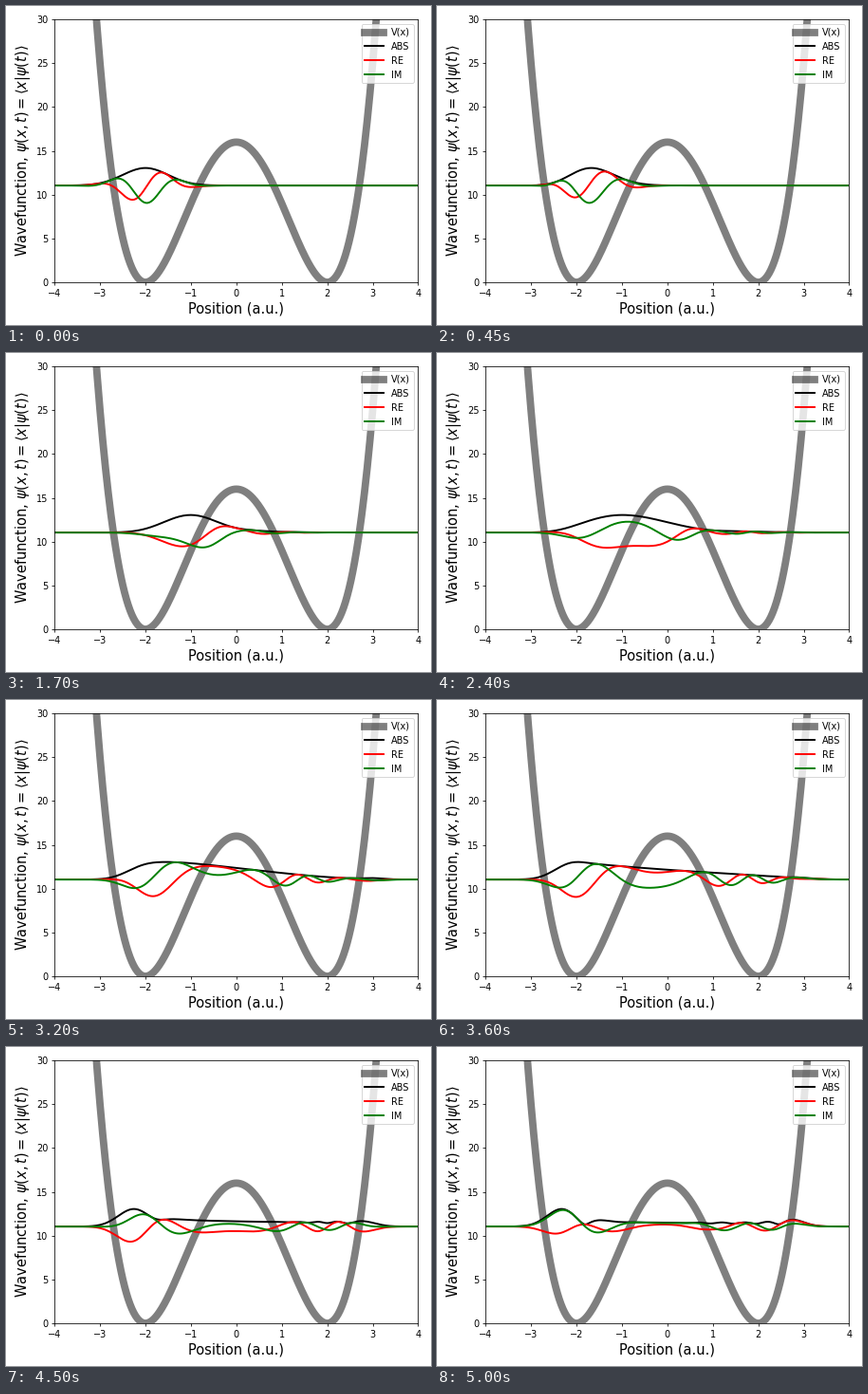
A matplotlib script that plays this animation: 448 by 336 pixels, repeating every 5050 ms.

```python
import numpy as np
import matplotlib.pyplot as plt
from matplotlib.animation import FuncAnimation

W, H, DPI = 448, 336, 70
FRAMES, INTERVAL, DT = 101, 50, 0.01
X0, K0, AMP = -2.0, 4.0, 2.0

plt.rcParams["font.family"] = "DejaVu Sans"


def potential(x):
    return (x**2 - 4) ** 2


# Sinc-grid Hamiltonian (hbar = m = 1)
x = np.linspace(-5, 5, 241)
dx = x[1] - x[0]
idx = np.arange(x.size)
diff = idx[:, None] - idx[None, :]
safe = np.where(diff == 0, 1, diff)
kinetic = np.where(diff == 0, np.pi**2 / 6, (-1.0) ** np.abs(diff) / safe**2) / dx**2
ham = kinetic + np.diag(potential(x))
levels, modes = np.linalg.eigh(ham)

# Gaussian packet moving right, expanded in energy states
psi0 = np.exp(-2 * (x - X0) ** 2 + 1j * K0 * x)
psi0 /= np.linalg.norm(psi0)
coeffs = modes.T @ psi0
energy = np.sum(levels * np.abs(coeffs) ** 2)


def packet(t):
    psi = modes @ (coeffs * np.exp(-1j * levels * t))
    return AMP * psi / np.abs(psi).max()


fig = plt.figure(figsize=(W / DPI, H / DPI), dpi=DPI)
left, right, top, bottom = 51.2, 434.4, 14.2, 291.0
ax = fig.add_axes([left / W, 1 - bottom / H, (right - left) / W, (bottom - top) / H])

xv = np.linspace(-4, 4, 401)
ax.plot(xv, potential(xv), color="black", alpha=0.5, lw=8, label="V(x)")
curves = [
    ax.plot([], [], color=color, lw=2, label=label)[0]
    for color, label in (("black", "ABS"), ("red", "RE"), ("green", "IM"))
]
ax.set_xlim(-4, 4)
ax.set_ylim(0, 30)
ax.set_xlabel("Position (a.u.)", fontsize=15)
ax.set_ylabel(r"Wavefunction, $\psi(x,t) = \langle x|\psi(t)\rangle$", fontsize=15)
ax.legend(loc="upper right")


def update(i):
    psi = packet(i * DT)
    for curve, part in zip(curves, (np.abs(psi), psi.real, psi.imag)):
        curve.set_data(x, energy + part)
    return curves


anim = FuncAnimation(
    fig, update, frames=FRAMES, init_func=lambda: update(0),
    interval=INTERVAL, repeat=True, repeat_delay=0, blit=False,
)
plt.show()
```
